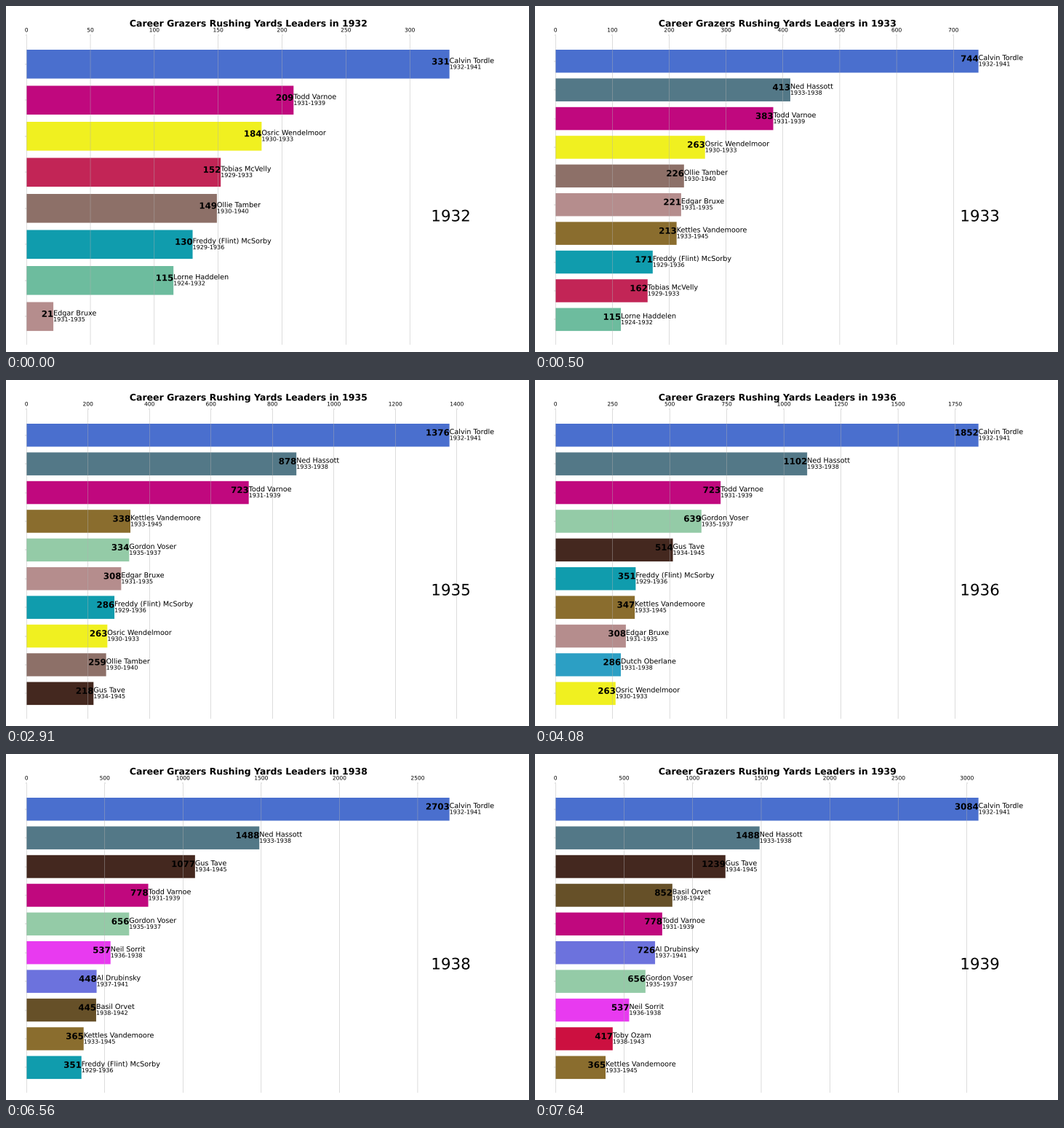
A matplotlib script that plays this animation: 719 by 475 pixels, repeating every 8000 ms.

```python
import matplotlib.pyplot as plt
from matplotlib import patheffects
from matplotlib.animation import FuncAnimation

WIDTH, HEIGHT, DPI = 719, 475, 64
LOOP_MS, STEP_MS = 8000, 40
LEFT, RIGHT, TOP, BOTTOM = 28.2, 638.7, 40.7, 465.4
FIRST_SEASON = 1932
CHANGES_MS = [500, 1660, 2910, 4080, 5240, 6560, 7640]
BAR = 0.8

# name, career, colour, first season shown, running totals (last one holds)
PLAYERS = [
    ("Calvin Tordle", "1932-1941", "#4a6fce", 1932,
     [331, 744, 1103, 1376, 1852, 2404, 2703, 3084]),
    ("Todd Varnoe", "1931-1939", "#c0087e", 1932,
     [209, 383, 565, 723, 723, 772, 778]),
    ("Osric Wendelmoor", "1930-1933", "#f0f020", 1932, [184, 263]),
    ("Tobias McVelly", "1929-1933", "#c22556", 1932, [152, 162]),
    ("Ollie Tamber", "1930-1940", "#8d7068", 1932, [149, 226, 259]),
    ("Freddy (Flint) McSorby", "1929-1936", "#109cad", 1932,
     [130, 171, 171, 286, 351]),
    ("Lorne Haddelen", "1924-1932", "#6dbc9e", 1932, [115]),
    ("Edgar Bruxe", "1931-1935", "#b58d8d", 1932, [21, 221, 287, 308]),
    ("Ned Hassott", "1933-1938", "#537887", 1933,
     [413, 542, 878, 1102, 1263, 1488]),
    ("Kettles Vandemoore", "1933-1945", "#8a6d2e", 1933,
     [213, 286, 338, 347, 365]),
    ("Gus Tave", "1934-1945", "#44281f", 1934,
     [155, 218, 514, 824, 1077, 1239]),
    ("Gordon Voser", "1935-1937", "#94cba7", 1935, [334, 639, 656]),
    ("Dutch Oberlane", "1931-1938", "#2c9fc4", 1936, [286]),
    ("Neil Sorrit", "1936-1938", "#e83af0", 1937, [489, 537]),
    ("Al Drubinsky", "1937-1941", "#6c72dd", 1937, [324, 448, 726]),
    ("Basil Orvet", "1938-1942", "#665028", 1938, [445, 852]),
    ("Toby Ozam", "1938-1943", "#cc1040", 1938, [145, 417]),
]

# Text drawn as outlines keeps sub-pixel positions and spacing.
OUTLINE = [patheffects.Normal()]

plt.rcParams.update({"font.family": "DejaVu Sans", "text.hinting": "none"})


def px(size):
    """Pixels to points."""
    return size * 72 / DPI


def top_ten(season):
    rows = [(totals[min(season - start, len(totals) - 1)], name, career, colour)
            for name, career, colour, start, totals in PLAYERS
            if start <= season]
    return sorted(rows, reverse=True)[:10]


def label(ax, text, x, row, size, **style):
    ax.annotate(text, (x, row), xytext=(0, -px(0.5)),
                textcoords="offset points", fontsize=px(size),
                annotation_clip=False, path_effects=OUTLINE, **style)


def season_chart(season):
    ax = fig.add_axes([LEFT / WIDTH, 1 - BOTTOM / HEIGHT,
                       (RIGHT - LEFT) / WIDTH, (BOTTOM - TOP) / HEIGHT])
    rows = top_ten(season)
    count = len(rows)
    for i, (total, name, career, colour) in enumerate(rows):
        ax.barh(i, total, height=BAR, color=colour, linewidth=0, snap=False)
        label(ax, str(total), total, i, 11.8, ha="right", va="baseline",
              weight="bold")
        label(ax, name, total, i, 9.63, ha="left", va="bottom")
        label(ax, career, total, i, 8.03, ha="left", va="top")

    margin = 0.05 * (count - 1 + BAR)
    ax.set_xlim(0, rows[0][0] * 1.05)
    ax.set_ylim(count - 1 + BAR / 2 + margin, -BAR / 2 - margin)
    ax.set_yticks(range(count), [""] * count)
    ax.xaxis.tick_top()
    ax.tick_params(length=px(1.87), width=px(0.43), pad=px(1.87),
                   color="#888888", labelsize=px(7.49))
    ax.grid(axis="x", color="#b0b0b0", linewidth=px(0.43), snap=False)
    plt.setp(ax.get_xticklabels(), path_effects=OUTLINE)
    ax.set_frame_on(False)

    ax.set_title(f"Career Grazers Rushing Yards Leaders in {season}",
                 fontsize=px(12.5), weight="bold", pad=0,
                 y=(BOTTOM - 28.2) / (BOTTOM - TOP), path_effects=OUTLINE)
    ax.text(1, 0.4, str(season), transform=ax.transAxes, ha="right",
            fontsize=px(21.4), path_effects=OUTLINE)
    return ax


fig = plt.figure(figsize=(WIDTH / DPI, HEIGHT / DPI), dpi=DPI,
                 facecolor="white")
charts = [season_chart(FIRST_SEASON + i) for i in range(len(CHANGES_MS) + 1)]


def update(frame):
    frame_end = (frame + 1) * STEP_MS
    current = sum(change < frame_end for change in CHANGES_MS)
    for i, ax in enumerate(charts):
        ax.set_visible(i == current)
    return charts


animation = FuncAnimation(fig, update, frames=LOOP_MS // STEP_MS,
                          interval=STEP_MS, repeat=True, repeat_delay=0)
plt.show()
```
